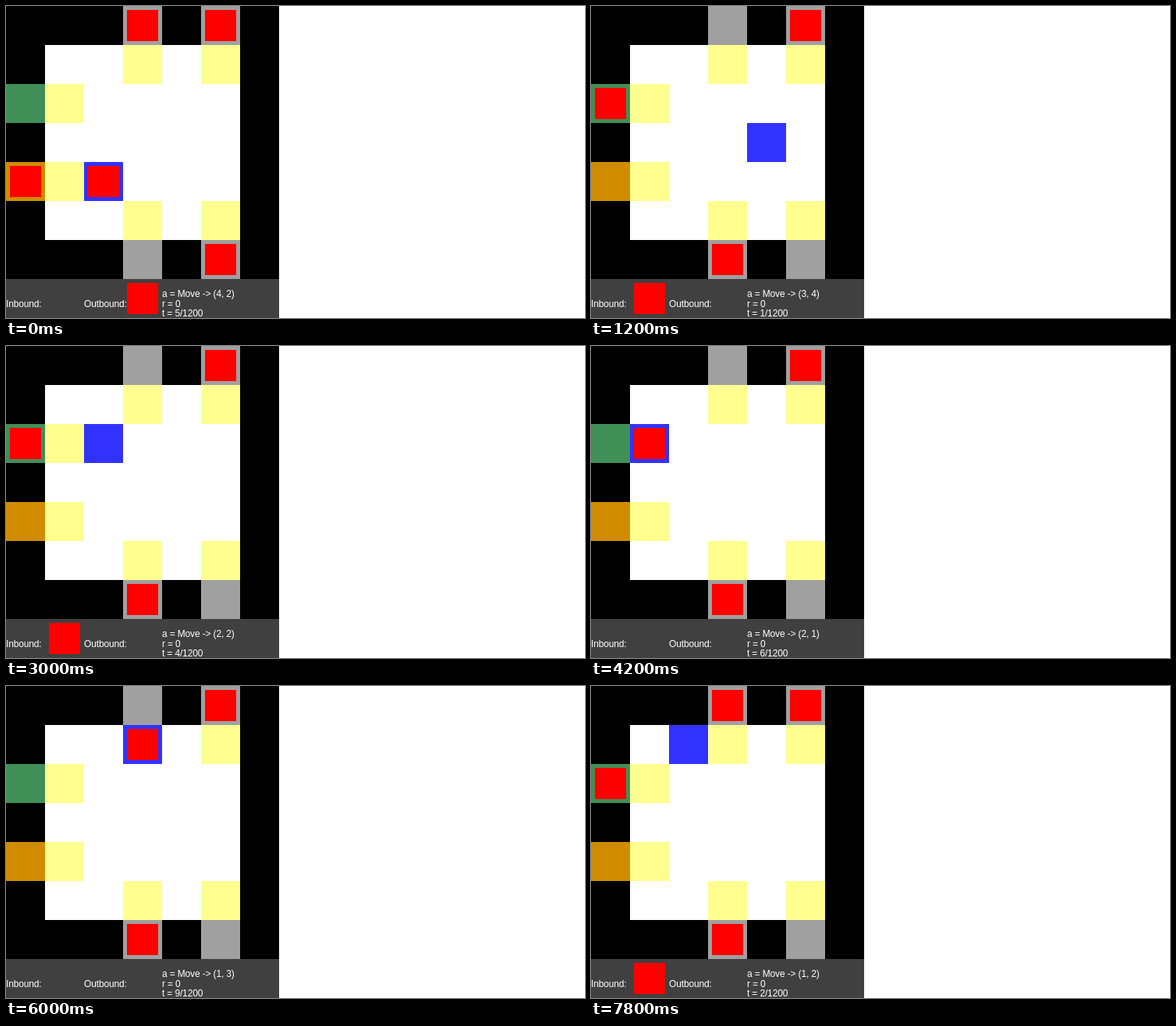
Recreate the animation shown at these times as an HTML page with a canvas. Size 742 by 400 pixels, loop 8 s.

```html
<!DOCTYPE html>
<html>
<head>
<meta charset="utf-8">
<style>
html, body { margin: 0; width: 100%; height: 100%; overflow: hidden; background: #fff; }
canvas { display: block; }
</style>
</head>
<body>
<canvas id="stage" width="742" height="400"></canvas>
<script>
const ctx = document.getElementById('stage').getContext('2d');
const CELL = 50, STEP = 600, LOOP = 8000;
const PICKUP = 7, DELIVERY = 11;
const GRAY = '#a0a0a0', GREEN = '#408f57', ORANGE = '#d08c00';
const YELLOW = '#ffff8f', BLUE = '#3232ff', RED = '#ff0000', BAR = '#404040';

// One letter per step: up, left, right, or a dot for staying put.
const ROUTE = 'UULLL.RRU.UL';
const MOVES = { U: [-1, 0], L: [0, -1], R: [0, 1], '.': [0, 0] };

const onFloor = n => Math.min(5, Math.max(1, n));

function rect(x, y, w, h, color) {
  ctx.fillStyle = color;
  ctx.fillRect(x, y, w, h);
}
const cell = (row, col, color) => rect(col * CELL, row * CELL, CELL, CELL, color);
const box = (row, col) => rect(col * CELL + 5, row * CELL + 5, CELL - 10, CELL - 10, RED);

function label(text, x, y) {
  ctx.fillStyle = '#fff';
  ctx.fillText(text, x, y);
}

function dock(row, col, color, full) {
  cell(row, col, color);
  cell(onFloor(row), onFloor(col), YELLOW);
  if (full) box(row, col);
}

// Walls block the agent, but the attempted cell is still reported.
function walk(step) {
  let action = [4, 2];
  if (step === 0) return { at: action, action };
  let at = [4, 4];
  for (const key of ROUTE.slice(0, step - 1)) {
    action = at.map((n, axis) => n + MOVES[key][axis]);
    at = action.map(onFloor);
  }
  return { at, action };
}

function draw(step) {
  const { at, action } = walk(step);
  const outbound = step === 0;
  const delivered = step >= DELIVERY;
  const storing = step >= PICKUP && !delivered;
  const waiting = !outbound && !storing;
  const count = outbound ? 5 : (step - 1) % (DELIVERY - 1);

  rect(0, 0, 742, 400, '#fff');
  rect(0, 0, 350, 350, '#000');
  rect(50, 50, 250, 250, '#fff');
  rect(0, 350, 350, 50, BAR);

  dock(0, 3, GRAY, outbound || delivered);
  dock(0, 5, GRAY, true);
  dock(6, 3, GRAY, !outbound);
  dock(6, 5, GRAY, outbound);
  dock(2, 0, GREEN, waiting);
  dock(4, 0, ORANGE, outbound);

  cell(...at, BLUE);
  if (outbound || storing) box(...at);
  if (waiting) box(7, 1);
  if (outbound) box(7, 3);

  ctx.font = '12px "Liberation Sans", Arial, sans-serif';
  ctx.letterSpacing = '-0.15px';
  label('Inbound:', 0, 386);
  label('Outbound:', 100, 386);
  label(`a = Move -> (${action.join(', ')})`, 200, 373);
  label(`r = ${step === DELIVERY ? 1 : 0}`, 200, 386);
  label(`t = ${count}/1200`, 200, 398);
}

function tick() {
  draw(Math.floor(performance.now() % LOOP / STEP));
  requestAnimationFrame(tick);
}
tick();
</script>
</body>
</html>
```
